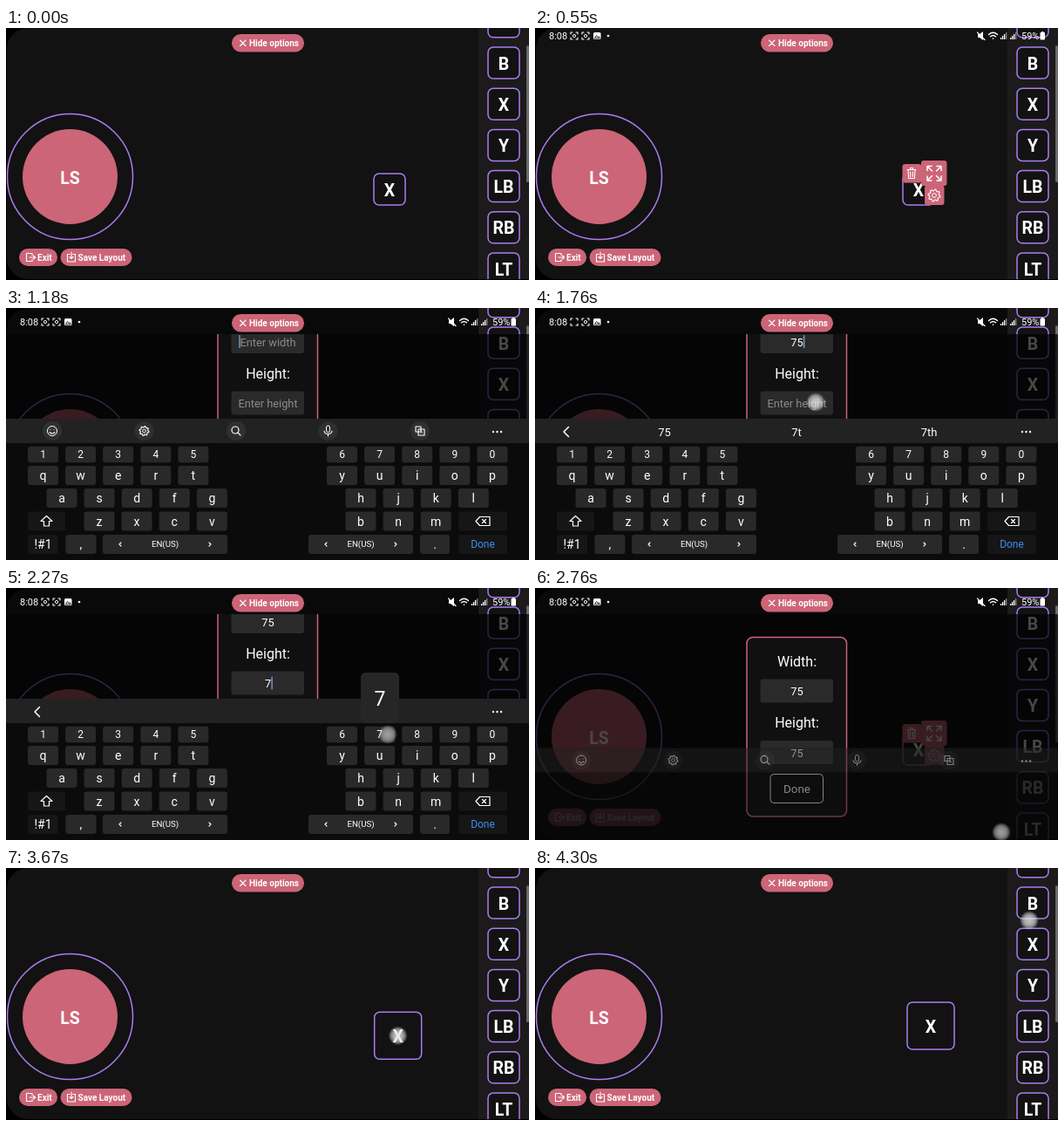
Recreate the animation shown at these times as an HTML page. Size 600 px wide and 289 px high, loop 4330 ms.

```html
<!DOCTYPE html>
<html lang="en">
<head>
<meta charset="utf-8">
<title>Gamepad layout editor</title>
<style>
html, body { margin: 0; width: 100%; height: 100%; overflow: hidden; background: #000; }
svg { display: block; width: 600px; height: 289px; font-family: Roboto, "Liberation Sans", sans-serif; }
</style>
</head>
<body>
<svg id="stage" viewBox="0 0 600 289"></svg>
<script>
const LOOP = 4330;
const PINK = '#cc6577', PURPLE = '#a97df0', BG = '#121212';
const stage = document.getElementById('stage');

function set(el, attrs) {
  for (const k in attrs) el.setAttribute(k, attrs[k]);
  return el;
}
function add(parent, tag, attrs = {}) {
  return parent.appendChild(set(document.createElementNS('http://www.w3.org/2000/svg', tag), attrs));
}
const group = (parent, attrs) => add(parent, 'g', attrs);
const box = (parent, x, y, width, height, rx, fill, more) =>
  add(parent, 'rect', { x, y, width, height, rx, fill, ...more });
const disc = (parent, cx, cy, r, fill, more) => add(parent, 'circle', { cx, cy, r, fill, ...more });
const line = (parent, d, stroke = '#fff', width = 1.1, more) =>
  add(parent, 'path', { d, stroke, 'stroke-width': width, fill: 'none', 'stroke-linecap': 'round', 'stroke-linejoin': 'round', ...more });
function text(parent, x, y, str, size, more) {
  const el = add(parent, 'text', { x, y: y + size * .36, 'font-size': size, fill: '#fff', 'text-anchor': 'middle', ...more });
  el.textContent = str;
  return el;
}
const bold = { 'font-weight': 700 };
const left = { 'text-anchor': 'start' };
const show = (el, on) => el.setAttribute('visibility', on ? 'inherit' : 'hidden');
const fade = (el, v) => el.setAttribute('opacity', v);
const shift = (el, x, y) => el.setAttribute('transform', `translate(${x} ${y})`);

// Cog outline centred on 0,0
function gear(parent, x, y, r) {
  let d = '';
  for (let i = 0; i < 32; i++) {
    const a = (i + .5) * Math.PI / 16, k = i % 4 < 2 ? r : r * .76;
    d += (i ? 'L' : 'M') + (x + k * Math.cos(a)).toFixed(2) + ' ' + (y + k * Math.sin(a)).toFixed(2);
  }
  line(parent, d + 'Z');
  disc(parent, x, y, r * .34, 'none', { stroke: '#fff' });
}

// Definitions
const defs = add(stage, 'defs');
box(add(defs, 'clipPath', { id: 'below' }), 0, 30, 600, 259, 0, '#fff');
const glow = add(defs, 'radialGradient', { id: 'glow' });
[[0, .85], [.5, .7], [.72, .5], [1, 0]].forEach(([offset, o]) =>
  add(glow, 'stop', { offset, 'stop-color': '#e4e4e4', 'stop-opacity': o }));

// Editor screen
box(stage, 0, 0, 600, 289, 0, '#000');
box(stage, 1, 0, 640, 288, 24, BG);
const scrim = box(stage, 0, 0, 542, 30, 0, '#000', { opacity: 0 });

function pad(parent, x, y, size, label) {
  return [
    box(parent, x, y, size, size, 6, BG, { stroke: PURPLE, 'stroke-width': 1.5 }),
    text(parent, x + size / 2, y + size / 2 + .6, label, 19.5, bold)
  ];
}

disc(stage, 73.5, 170.5, 72, 'none', { stroke: PURPLE, 'stroke-width': 1.5 });
disc(stage, 73.5, 170.5, 54.5, PINK);
text(stage, 73.5, 171.5, 'LS', 19.5, bold);

box(stage, 542, 0, 58, 288, 0, '#1b1b1b');
['A', 'B', 'X', 'Y', 'LB', 'RB', 'LT'].forEach((s, i) => pad(stage, 553, 22 + (i - 1) * 47.2, 36, s));
box(stage, 597, 20, 3, 157, 1.5, '#6b6b6b');
box(stage, 0, 288, 600, 1, 0, '#000');

function pill(x, y, w, h, label, tx, icon) {
  box(stage, x, y, w, h, h / 2, PINK);
  text(stage, tx, y + h / 2 + .2, label, 10, { ...bold, ...left });
  line(stage, icon);
}
pill(15, 253, 44, 20, 'Exit', 36, 'M30 260.500V258.500H23.500V267.500H30V265.500M27 263H33.500M31.500 261L33.500 263L31.500 265');
pill(62.500, 253, 82, 20, 'Save Layout', 82.500, 'M73 259.500H70.500V268H79.500V259.500H77M75 257V264.500M73 262.500L75 264.500L77 262.500');
pill(259, 7, 83, 20.500, 'Hide options', 279, 'M268.500 14L275 20.500M275 14L268.500 20.500');

// The movable X button and its tools
const widget = group(stage);
const [frame, label] = pad(widget, 422, 167, 36, 'X');
const tools = group(widget);
box(tools, 421.500, 156, 22, 21.500, 3, PINK);
box(tools, 443, 152, 29.500, 29, 3, PINK);
box(tools, 447, 180.500, 22.500, 22.500, 3, PINK);
line(tools, 'M427 162.500H437M430.500 162V160.500H433.500V162M428 163L428.700 172.500H435.300L436 163M430.700 165V170.500M433.300 165V170.500');
line(tools, 'M450 163.500V158.500H455M450 158.500L455.500 164M461 158.500H466V163.500M466 158.500L460.500 164M450 170V175H455M450 175L455.500 169.500M466 170V175H461M466 175L460.500 169.500', '#fff', 1.5);
gear(tools, 458, 192, 7);

// Dialog window
const modal = group(stage, { 'clip-path': 'url(#below)' });
box(modal, 0, 30, 600, 259, 0, '#000', { opacity: .72 });
const card = group(modal);
box(card, 243, 56.500, 114.500, 205.500, 7, '#101010', { stroke: PINK, 'stroke-width': 1.5 });

function field(y, name) {
  text(card, 300.500, y - 34, name + ':', 16);
  box(card, 258.500, y - 13.500, 83.500, 27, 3, '#2a2a2a');
  return {
    hint: 'Enter ' + name.toLowerCase(),
    value: text(card, 300.500, y + .5, '', 12.8),
    caret: line(card, `M0 ${y - 7}V${y + 7}`, '#86aef5', 1.2)
  };
}
const fields = [field(118, 'Width'), field(188.500, 'Height')];
box(card, 270, 213.500, 60.500, 33, 4, 'none', { stroke: '#fff' });
text(card, 300.500, 230.500, 'Done', 13.400);

// Status bar
const status = group(stage);
text(status, 16, 16, '8:08', 11, left);
[45, 58].forEach(x => line(status, `M${x - 4} 14V12H${x - 2}M${x + 2} 12H${x + 4}V14M${x + 4} 18V20H${x + 2}M${x - 2} 20H${x - 4}V18`));
const blink = disc(status, 45, 16, 1.600, 'none', { stroke: '#fff' });
disc(status, 58, 16, 1.600, 'none', { stroke: '#fff' });
box(status, 67, 12, 8.500, 8, 1.500, '#fff');
line(status, 'M68.500 18.500L70.500 15.500L72 17.500L73 16.500L74.200 18.500Z', '#222', 1);
disc(status, 84, 16, 1.300, '#fff');
add(status, 'path', { d: 'M508 14H510L514 11V21L510 18H508Z', fill: '#fff' });
line(status, 'M507.500 12L516 20.500', '#fff', 1.200);
line(status, 'M520.500 14.500Q525.500 10 530.500 14.500M522.500 16.800Q525.500 14 528.500 16.800M525.500 19V19.200', '#fff', 1.400);
[534, 545].forEach(x => {
  for (let i = 0; i < 4; i++) box(status, x + i * 2, 18 - i * 2, 1.300, 2 + i * 2, 0, i < 3 ? '#fff' : '#888');
});
text(status, 558, 16, '59%', 11, left);
box(status, 579.500, 12, 5.500, 8.500, 1, '#fff');
box(status, 581, 11, 2.500, 1.500, 0, '#fff');

// Keyboard
const board = group(stage);
box(board, 0, 127, 600, 170, 0, '#0b0b0b');
box(board, 0, 127, 600, 28, 0, '#222');
const keys = group(board);
function key(x, y, w, h, str, size, dark, fill = '#fff') {
  box(keys, x - w / 2, y - h / 2, w, h, 3, dark ? '#161616' : '#292929');
  text(keys, x, y, str, size, { fill });
}
function row(str, x, y, h, size) {
  [...str].forEach((c, i) => key(x + i * 43.1, y, 35, h, c, size));
}
row('12345', 42.500, 168, 18.500, 12);
row('67890', 385.500, 168, 18.500, 12);
row('qwert', 42.500, 192, 22, 14);
row('yuiop', 385.500, 192, 22, 14);
row('asdfg', 64, 218, 22, 14);
row('hjkl', 407, 218, 22, 14);
row('zxcv', 107, 244.500, 22, 14);
row('bnm', 407, 244.500, 22, 14);
key(46.500, 244.500, 43, 22, '', 12, true);
line(keys, 'M46.500 238.500L53 244.500H49.500V250H43.500V244.500H40Z', '#fff', 1.200);
key(547, 244.500, 56, 22, '', 12, true);
line(keys, 'M539 244.500L543.500 239.500H555V249.500H543.500ZM546.500 242.500L550.500 246.500M550.500 242.500L546.500 246.500', '#fff', 1.200);
key(42.500, 271, 35, 22, '!#1', 14, true);
key(86, 271, 35, 22, ',', 14);
key(492, 271, 34, 22, '.', 14);
key(547, 271, 56, 22, 'Done', 12, true, '#3f8cf4');
[[182.500, 143], [407, 120]].forEach(([x, w]) => {
  key(x, 271, w, 22, 'EN(US)', 9.700);
  const a = w / 2 - 18;
  line(keys, `M${x - a + 3} 269L${x - a + 1} 271L${x - a + 3} 273M${x + a - 3} 269L${x + a - 1} 271L${x + a - 3} 273`);
});
[559, 563.500, 568].forEach(x => disc(board, x, 142, 1.200, '#fff'));

const strip = group(board);
[53, 158.500, 264, 369.500, 475].forEach(x => disc(strip, x, 141, 11, '#303030'));
disc(strip, 53, 141, 5.500, 'none', { stroke: '#fff' });
line(strip, 'M51 139.500V139.600M55 139.500V139.600M50.200 142.500Q53 145.500 55.800 142.500');
gear(strip, 158.500, 141, 5.500);
disc(strip, 263, 140, 4, 'none', { stroke: '#fff', 'stroke-width': 1.200 });
line(strip, 'M266 143L269 146');
box(strip, 367.500, 135, 4, 7.500, 2, 'none', { stroke: '#fff' });
line(strip, 'M365 141Q365.500 144.500 369.500 144.500Q373.500 144.500 374 141M369.500 144.500V147');
line(strip, 'M470 136H476V142H470ZM473 139H480V146H473Z');
text(strip, 476.500, 142.500, 'A', 5.500);

const back = line(board, 'M38.500 136.500L33 142L38.500 147.500', '#fff', 1.500);
const hints = group(board);
[['75', 148.500], ['7t', 300], ['7th', 452]].forEach(([s, x]) => text(hints, x, 142, s, 13));

const popup = group(board);
box(popup, -22, 97, 44, 58, 5, '#262626');
const popText = text(popup, 0, 127, '', 23);

const finger = disc(stage, 0, 0, 11, 'url(#glow)');

// Motion
const ramp = (t, a, b) => Math.min(1, Math.max(0, (t - a) / (b - a)));
const ease = p => p * p * (3 - 2 * p);
const within = (t, a, b) => t >= a && t < b;

// x, y, down, up
const touches = [
  [440, 188, 130, 260], [458, 193, 400, 520], [324, 117, 860, 1010],
  [433, 168, 1220, 1340], [219, 168, 1420, 1540], [322, 108, 1700, 1850],
  [438, 168, 2215, 2335], [218, 168, 2400, 2520], [535, 280, 2610, 2830],
  [310.500, 228.500, 3050, 3255], [449, 196, 3330, 3440], [449, 194, 3560, 3990],
  [567, 60, 4165, 4400]
];
const presses = [[0, '7', 1235], [0, '5', 1435], [1, '7', 2235], [1, '5', 2420]];

function draw(t) {
  const resized = t >= 3130;
  const size = resized ? 54 : 36;
  const drag = ease(ramp(t, 3590, 3940));
  set(frame, { width: size, height: size });
  set(label, { x: 422 + size / 2, y: 167 + size / 2 + 7.600 });
  shift(widget, 5 * drag, -13 * drag);
  shift(tools, 0, size - 36);
  show(tools, within(t, 210, 3390));

  const open = ramp(t, 570, 690) * (1 - ramp(t, 3100, 3200));
  fade(modal, open);
  fade(scrim, open * .5);
  shift(status, 0, -24 * (1 - ramp(t, 480, 580) + ramp(t, 3150, 3270)));
  show(blink, !within(t, 1690, 1820));

  const pan = ease(ramp(t, 1000, 1090)) - ease(ramp(t, 2650, 2745));
  shift(card, 0, -79.500 * pan);

  const focus = within(t, 930, 1800) ? 0 : within(t, 1800, 2640) ? 1 : -1;
  const values = ['', ''];
  let last = 0, pressed = null;
  for (const [i, c, at] of presses) {
    if (t < at) continue;
    values[i] += c;
    last = at;
    if (t < at + 110) pressed = c;
  }
  fields.forEach((f, i) => {
    const v = values[i];
    f.value.textContent = v || f.hint;
    f.value.setAttribute('fill', v ? '#fff' : '#8b8b8b');
    show(f.caret, focus === i);
    shift(f.caret, v ? 301.500 + v.length * 3.600 : 268, 0);
  });

  const leave = ramp(t, 2640, 2880);
  show(board, within(t, 960, 2880));
  shift(board, 0, 100 * (1 - ease(ramp(t, 970, 1090))) + 112 * leave);
  fade(board, ramp(t, 970, 1060) * (1 - leave));
  fade(keys, 1 - ramp(t, 2640, 2730));
  const typed = focus >= 0 && values[focus] !== '';
  show(strip, !typed);
  show(back, typed);
  show(hints, typed && values[focus] === '75' && t > last + 60);
  show(popup, pressed !== null);
  if (pressed) {
    popText.textContent = pressed;
    shift(popup, pressed === '7' ? 429 : 215, 0);
  }

  const touch = touches.find(([, , a, b]) => within(t, a, b));
  show(finger, !!touch);
  if (touch) {
    const [x, y, a, b] = touch;
    shift(finger, x + 5 * drag * (a === 3560), y - 13 * drag * (a === 3560));
    fade(finger, ramp(t, a, a + 40) * (1 - ramp(t, b - 85, b)));
  }
}

function tick() {
  draw(performance.now() % LOOP);
  requestAnimationFrame(tick);
}
tick();
</script>
</body>
</html>
```
